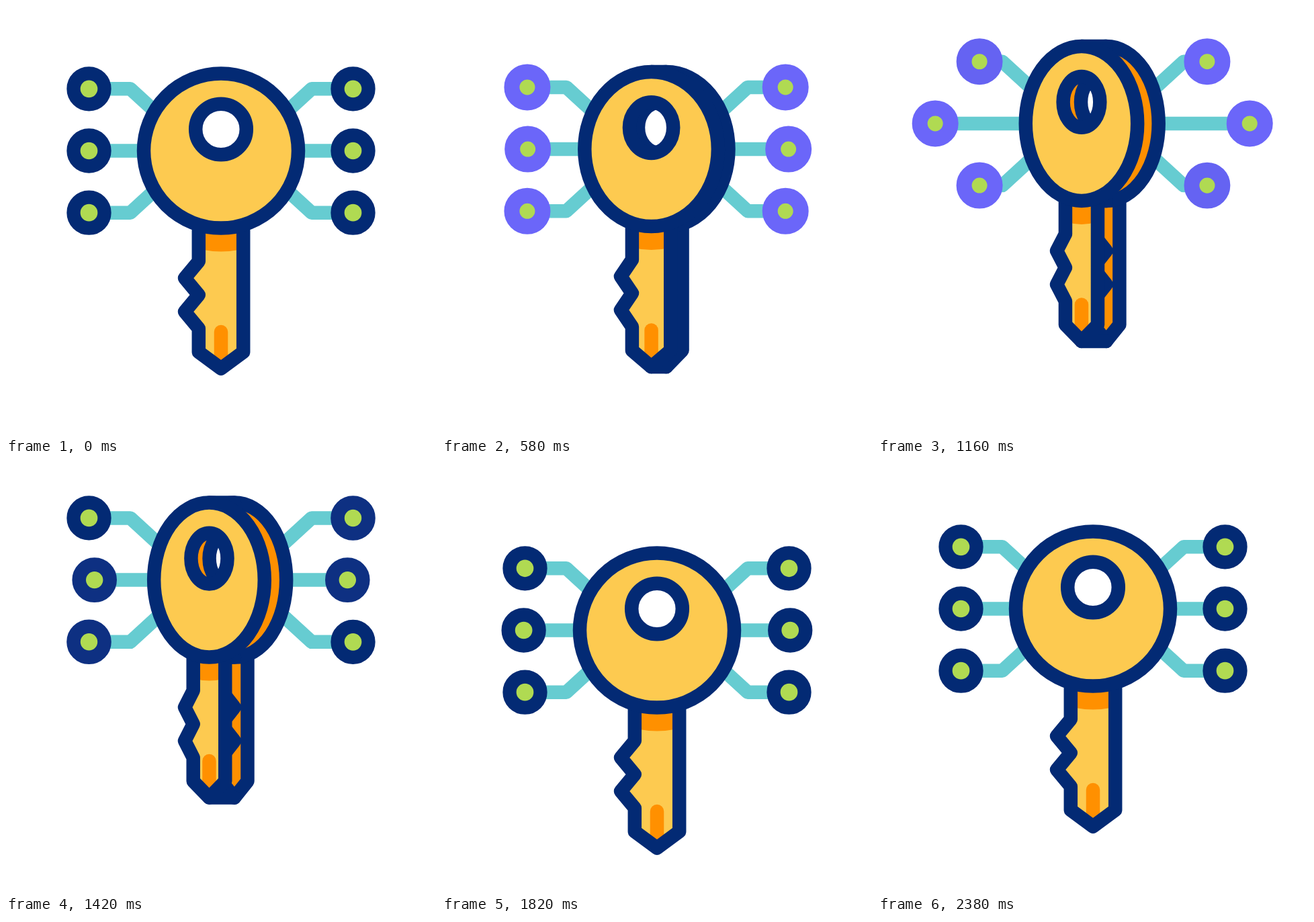
Write an HTML page with a canvas that moves like this. It is 640 px wide and 640 px high and loops after 2800 ms.

```html
<!DOCTYPE html>
<html lang="en">
<head>
<meta charset="utf-8">
<title>Digital key</title>
<style>
  html, body { margin: 0; width: 100%; height: 100%; overflow: hidden; background: #fff; }
  canvas { display: block; width: 100vw; height: 100vh; }
</style>
</head>
<body>
<canvas id="stage" width="640" height="640"></canvas>
<script>
const LOOP = 2800, LINE = 20.5, CX = 320, CY = 215.5, TIP = 539.5;
const NAVY = '#032a74', YELLOW = '#fdca50', ORANGE = '#ff9000',
      TEAL = '#66ccd1', GREEN = '#b0da52';
const NAVY_RGB = [3, 42, 116], PURPLE_RGB = [107, 102, 249];
const ctx = document.getElementById('stage').getContext('2d');

const sine = u => (1 - Math.cos(Math.PI * u)) / 2;
const quadOut = u => u * (2 - u);
const decay = u => (1 - Math.exp(-3.7 * u)) / (1 - Math.exp(-3.7));

// Keys are [time, value, easing into the key].
function track(...keys) {
  return t => {
    const i = keys.findIndex(key => t < key[0]);
    if (i === 0) return keys[0][1];
    if (i < 0) return keys[keys.length - 1][1];
    const [t0, v0] = keys[i - 1], [t1, v1, ease = sine] = keys[i];
    return v0 + (v1 - v0) * ease((t - t0) / (t1 - t0));
  };
}

const lift = track([210, 0], [392, 41], [1400, -43.6, decay], [1756, 40.5], [2035, -26], [2370, 0]);
const turn = track([415, 0], [1400, 1, decay], [1740, 0]);
const spread = track([220, 0], [480, -8.2], [560, -8.2], [1040, 39, quadOut], [1140, 39],
  [1415, -8.2], [1440, -8.2], [1780, 2], [2020, 0]);
const pull = track([550, 0], [1040, 28, quadOut], [1140, 28], [1410, 0]);
const glow = track([400, 0], [540, 1], [1180, 1], [1484, 0]);

function stroke(color, width = LINE) {
  ctx.strokeStyle = color;
  ctx.lineWidth = width;
  ctx.stroke();
}

function fill(color) {
  ctx.fillStyle = color;
  ctx.fill();
}

function line(points, color) {
  ctx.beginPath();
  points.forEach(([x, y]) => ctx.lineTo(x, y));
  stroke(color);
}

function oval(x, y, rx, ry = rx) {
  ctx.beginPath();
  ctx.ellipse(x, y, rx, ry, 0, 0, Math.PI * 2);
}

function shank(x, half, tooth) {
  ctx.beginPath();
  ctx.moveTo(x - half, 300);
  for (let i = 0; i < 5; i++) ctx.lineTo(i % 2 ? tooth : x - half, 380 + 25 * i);
  ctx.lineTo(x - half, 515);
  ctx.lineTo(x, TIP);
  ctx.lineTo(x + half, 515);
  ctx.lineTo(x + half, 300);
  ctx.closePath();
}

function drawLinks(t, dir) {
  const at = d => CX + dir * d;
  const time = dir > 0 ? t + 18 : t;
  const nodes = [-1, 0, 1].map(row => ({
    row,
    x: at(196.5 + (row ? -pull(time) : spread(time))),
    y: CY + row * 92.2
  }));
  for (const { row, x, y } of nodes) {
    line(row ? [[x, y], [at(135), y], [at(75), y - row * 55]] : [[x, y], [at(60), y]], TEAL);
  }
  for (const { row, x, y } of nodes) {
    const late = row === 0 || row === -dir;
    const k = glow(late ? t : t + 64);
    const rgb = NAVY_RGB.map((c, i) => Math.round(c + (PURPLE_RGB[i] - c) * k));
    oval(x, y, 23);
    fill(GREEN);
    stroke(`rgb(${rgb})`, 20.3 + 2.7 * k);
  }
}

function drawBack(p, front) {
  const shift = 20 * Math.sqrt(p), x = CX + shift;
  shank(x, 33.2 - .685 * shift, x);
  fill(ORANGE);
  stroke(NAVY);
  oval(x, CY, 115 - 18 * p - shift, 115);
  fill(ORANGE);
  stroke(NAVY);
  for (const y of [CY - 115, CY + 115, TIP]) line([[front, y], [x, y]], NAVY);
}

function drawKey(t) {
  const p = turn(t), s = 1 - .287 * p, front = CX - 17.7 * p;
  if (p > 0) drawBack(p, front);

  const body = () => shank(front, 33.2 * s, CX - 54);
  body();
  fill(YELLOW);
  ctx.save();
  ctx.clip();
  oval(front, CY, 150 * s, 150);
  fill(ORANGE);
  line([[front, 485], [front, 545]], ORANGE);
  ctx.restore();
  body();
  stroke(NAVY);

  oval(front, CY, 115 * s, 115);
  fill(YELLOW);
  stroke(NAVY);

  // The hole shows its inner wall and the rim of the far face.
  const rim = x => oval(x, CY - 32, 37.8 * s, 37.8);
  rim(front);
  fill(p > 0 ? ORANGE : '#fff');
  if (p > 0) {
    ctx.save();
    ctx.clip();
    rim(CX + 9.7 * p);
    fill('#fff');
    stroke(NAVY);
    ctx.restore();
  }
  rim(front);
  stroke(NAVY);
}

function draw(t) {
  ctx.setTransform(1, 0, 0, 1, 0, 0);
  ctx.fillStyle = '#fff';
  ctx.fillRect(0, 0, 640, 640);
  ctx.lineCap = ctx.lineJoin = 'round';
  ctx.translate(0, lift(t));
  drawLinks(t, -1);
  drawLinks(t, 1);
  drawKey(t);
}

const start = performance.now();
function tick() {
  draw((performance.now() - start) % LOOP);
  requestAnimationFrame(tick);
}
tick();
</script>
</body>
</html>
```
